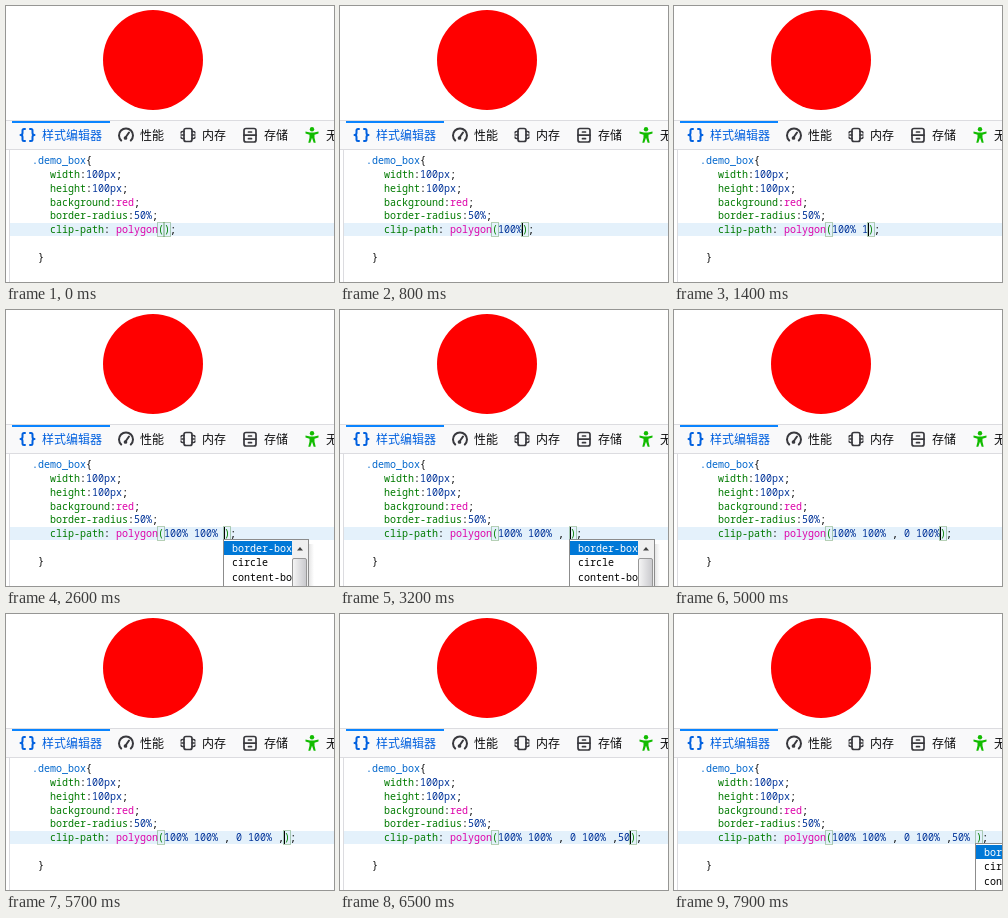
An HTML page that plays this animation: 328x276 px, repeating every 8 s.

```html
<!DOCTYPE html>
<html lang="zh-CN">
<head>
<meta charset="utf-8">
<title>Style editor</title>
<style>
  html, body { margin: 0; width: 100%; height: 100%; overflow: hidden; background: #fff; }
  svg { display: block; }
  text { white-space: pre; }
  .code { font: 10px "Noto Sans Mono", "DejaVu Sans Mono", monospace; fill: #000; }
  .tab { font: 12px "Noto Sans CJK SC", "Noto Sans CJK", sans-serif; fill: #0c0c0d; }
  .tab .active { fill: #0060df; }
  .class { fill: #0066cc; }
  .prop { fill: #007a00; }
  .num { fill: #003399; }
  .word { fill: #dd00a9; }
  .match { fill: #008000; }
  .icon { fill: none; stroke: #38383d; stroke-width: 1.7; stroke-linecap: round; stroke-linejoin: round; }
  .box { fill: none; stroke: #4a8a4a; stroke-opacity: .4; }
</style>
</head>
<body>
<svg width="328" height="276" viewBox="0 0 328 276">
  <defs>
    <linearGradient id="shade">
      <stop offset="0" stop-opacity=".1"/>
      <stop offset="1" stop-opacity="0"/>
    </linearGradient>
    <linearGradient id="thumb">
      <stop offset="0" stop-color="#f6f6f6"/>
      <stop offset="1" stop-color="#c8c8cc"/>
    </linearGradient>
    <clipPath id="listClip"><rect x="1" y="230" width="68" height="46"/></clipPath>
  </defs>

  <rect width="328" height="276" fill="#fff"/>
  <circle cx="147" cy="54" r="50" fill="#f00"/>

  <!-- toolbar -->
  <rect y="114" width="328" height="30" fill="#f9f9fa"/>
  <path d="M0 114.500H328M0 143.500H328" stroke="#dcdce0"/>
  <rect x="6" y="115" width="98" height="2" fill="#0a84ff"/>
  <g class="icon" style="stroke:#0060df;stroke-width:2">
    <path d="M19 123h-1q-1.500 0-1.500 1.500v2.500q0 2-2 2 2 0 2 2v2.500q0 1.500 1.500 1.500h1"/>
    <path d="M24 123h1q1.500 0 1.500 1.500v2.500q0 2 2 2-2 0-2 2v2.500q0 1.500-1.500 1.500h-1"/>
  </g>
  <g class="icon">
    <path d="M115.200 134.500A7 7 0 1 1 124.800 134.500" stroke-width="2"/>
    <path d="M119.500 131.500L123 126.500" stroke-width="2"/>
    <circle cx="119.500" cy="132" r="1"/>
    <rect x="178" y="122.500" width="8" height="13" rx="2"/>
    <path d="M178 125.500h-1.500q-1.500 0-1.500 1.500M178 129h-3M178 132.500h-1.500q-1.500 0-1.500-1.500" stroke-width="1.400"/>
    <path d="M186 125.500h1.500q1.500 0 1.500 1.500M186 129h3M186 132.500h1.500q1.500 0 1.500-1.500" stroke-width="1.400"/>
    <rect x="238" y="122.500" width="12" height="13.500" rx="2"/>
    <path d="M238 129.200h12M242.500 126h3M242.500 132.700h3"/>
  </g>
  <g fill="#12bc00">
    <circle cx="306" cy="123.300" r="2.200"/>
    <path d="M299.500 125.500l4.500 1h4l4.500-1v2l-4 1.300v3l1.200 5h-2l-1.700-5-1.700 5h-2l1.200-5v-3l-4-1.300z"/>
  </g>
  <g class="tab">
    <text class="active" x="36" y="134">样式编辑器</text>
    <text x="134" y="134">性能</text>
    <text x="196" y="134">内存</text>
    <text x="258" y="134">存储</text>
    <text x="320" y="134">无障碍环境</text>
  </g>

  <!-- editor -->
  <path d="M3.500 144V276" stroke="#dcdce0"/>
  <rect x="4" y="217" width="324" height="13" fill="#e4f1fb"/>
  <g class="code" id="code"></g>
  <rect class="box" x="151.500" y="216.500" width="7" height="14"/>
  <rect class="box" id="close" y="216.500" width="7" height="14"/>
  <rect id="caret" y="217" width="1" height="13" fill="#000"/>

  <!-- completion list, placed at the caret -->
  <g id="popup">
    <rect x="86" y="234" width="5" height="42" fill="url(#shade)"/>
    <rect x=".5" y="229.500" width="85" height="60" fill="#fff" stroke="#8c8c8c"/>
    <rect x="1" y="231" width="68" height="14" fill="#0078d7"/>
    <g class="code" clip-path="url(#listClip)">
      <text x="9" y="242" fill="#fff">border-box</text>
      <text x="9" y="256">circle</text>
      <text x="9" y="271">content-box</text>
    </g>
    <rect x="69" y="230" width="16" height="46" fill="#f0f0f0"/>
    <rect x="69.500" y="248.500" width="14" height="40" rx="1.500" fill="url(#thumb)" stroke="#979797"/>
    <path d="M74 240.500l3-3.500 3 3.500z" fill="#404040"/>
  </g>
</svg>
<script>
const LOOP = 8000, CELL = 6, START = 158;
const TOP = 158, PITCH = 13.85;
const VALUE = "100% 100% , 0 100% ,50% ";
// time at which each character of VALUE is typed
const KEYS = [200, 400, 500, 800, 1200, 1400, 1600, 1700, 2100, 2600, 2800, 3200,
  3400, 3600, 4100, 4300, 4500, 5000, 5400, 5700, 6200, 6500, 6900, 7400];
const BLINK_OFF = 7900;

const $ = id => document.getElementById(id);
const span = (cls, s) => `<tspan class="${cls}">${s}</tspan>`;
const line = (row, x, body, id = "") =>
  `<text id="${id}" x="${x}" y="${Math.round(TOP + row * PITCH)}">${body}</text>`;
const rule = ([name, cls, value], i) =>
  line(i + 1, 44, `${span("prop", name)}:${span(cls, value)};`);

$("code").innerHTML = [
  line(0, 26, span("class", ".demo_box") + "{"),
  ...[
    ["width", "num", "100px"],
    ["height", "num", "100px"],
    ["background", "word", "red"],
    ["border-radius", "num", "50%"]
  ].map(rule),
  line(5, 44, "", "live"),
  line(7, 32, "}")
].join("");

const head = span("prop", "clip-path") + ": " + span("word", "polygon") + span("match", "(");
let shown = -1;

function setTyped(n) {
  const typed = VALUE.slice(0, n), x = START + n * CELL;
  $("live").innerHTML = head + typed.replace(/\d+%?/g, s => span("num", s)) + span("match", ")") + ";";
  $("close").setAttribute("x", x - .5);
  $("caret").setAttribute("x", x);
  $("popup").setAttribute("transform", `translate(${x - 1} 0)`);
  $("popup").style.display = typed.endsWith(" ") ? "" : "none";
}

function draw(t) {
  const n = KEYS.filter(k => k <= t).length;
  if (n !== shown) setTyped(shown = n);
  $("caret").style.display = n > 0 && t < BLINK_OFF ? "" : "none";
}

const begin = performance.now();
function tick() {
  draw((performance.now() - begin) % LOOP);
  requestAnimationFrame(tick);
}
tick();
</script>
</body>
</html>
```
